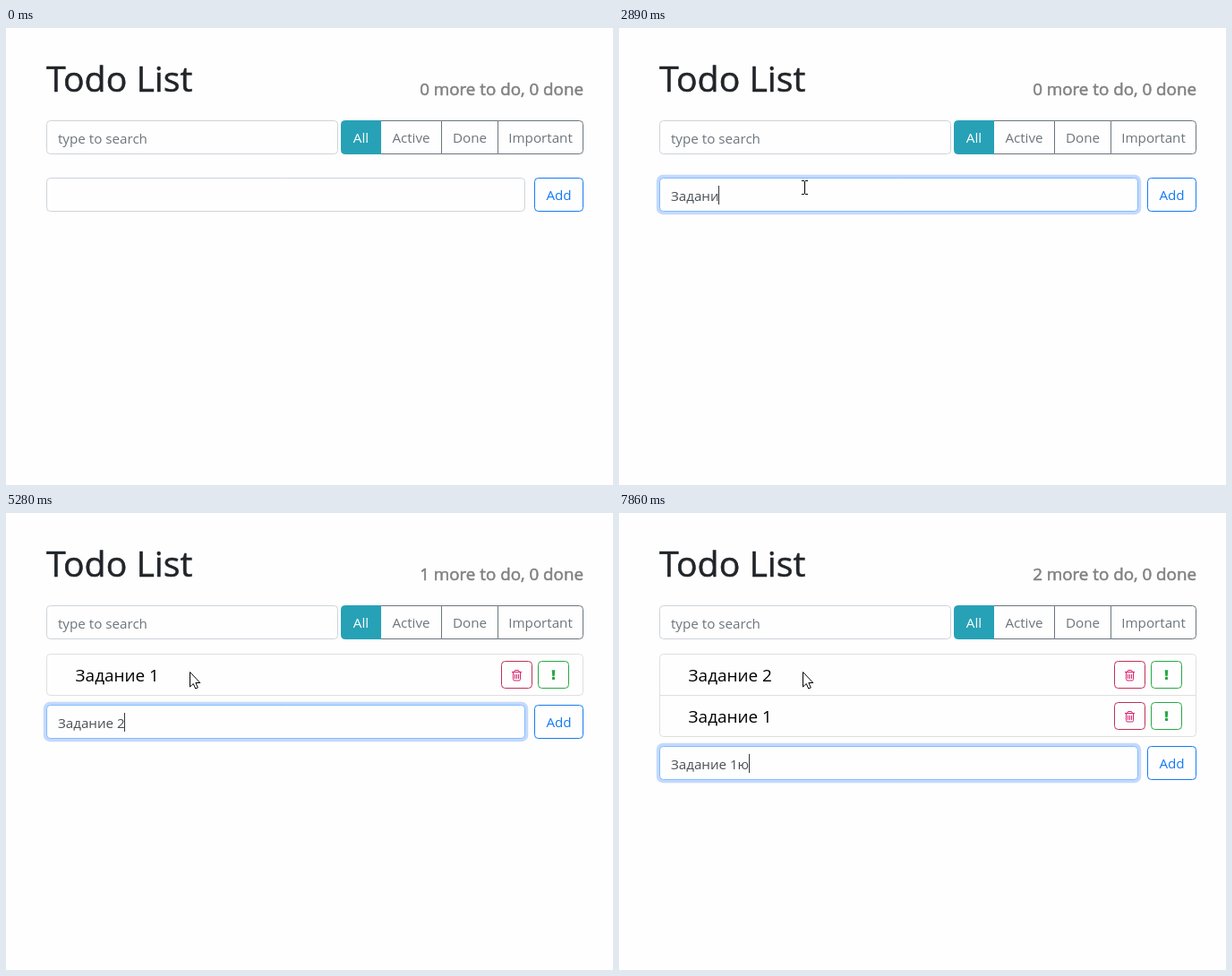
An HTML page with a canvas for the animation above (8000 ms loop, 678 by 510 pixels).

```html
<!DOCTYPE html>
<html lang="en">
<head>
<meta charset="utf-8">
<title>Todo List</title>
<style>
  html, body { margin: 0; width: 100%; height: 100%; overflow: hidden; background: #fefefe; }
  canvas { display: block; }
</style>
</head>
<body>
<canvas id="stage" width="678" height="510"></canvas>
<script>
const LOOP = 8000;
const FAMILY = '"Open Sans", "Noto Sans", sans-serif';
const BG = '#fefefe', GREY = '#6c757d', BORDER = '#ced4da', INK = '#495057';
const BLUE = '#147bf5', TEAL = '#27a1b6', GREEN = '#28a745', RED = '#c03058', PINK = '#d6246e';
const ctx = document.getElementById('stage').getContext('2d');

// Each entry: when the field is cleared, its text, and the time of every keystroke.
const entries = [
  { start: 1050, blink: [1620, 1990], text: 'Задание 1',
    keys: [1990, 2290, 2410, 2530, 2650, 2830, 2920, 3010, 3190] },
  { start: 3450, text: 'Задание 2',
    keys: [3880, 4050, 4170, 4290, 4530, 4700, 4860, 5040, 5280] },
  { start: 5600, blink: [6140, 6230], text: 'Задание 1ю',
    keys: [6230, 6320, 6500, 6680, 6860, 7040, 7160, 7380, 7680, 7860] }
];
const FOCUS = [1050, 1200];
const CLICK = [1050, 1140];
const MOVE = { start: 380, end: 940, step: 55.8 };

const clamp = v => Math.max(0, Math.min(1, v));
const within = (t, [a, b]) => t >= a && t < b;

function text(str, x, y, size, color, { align = 'left', weight = 0 } = {}) {
  ctx.font = `${size}px ${FAMILY}`;
  ctx.textAlign = align;
  ctx.fillStyle = color;
  ctx.fillText(str, x, y);
  if (weight) {
    ctx.strokeStyle = color;
    ctx.lineWidth = weight;
    ctx.lineJoin = 'round';
    ctx.strokeText(str, x, y);
  }
}

// One-pixel bordered box given by its outer edges.
function box(x, y, w, h, border, radii = 4, fill = BG) {
  ctx.beginPath();
  ctx.roundRect(x + 0.5, y + 0.5, w - 1, h - 1, radii);
  ctx.fillStyle = fill;
  ctx.fill();
  ctx.strokeStyle = border;
  ctx.lineWidth = 1;
  ctx.stroke();
}

function button(label, x, y, w, color, border, radii, fill) {
  box(x, y, w, 38, border, radii, fill);
  text(label, x + w / 2, y + 25, 15.2, color, { align: 'center' });
}

function lines(color, ...segments) {
  ctx.strokeStyle = color;
  ctx.lineWidth = 1;
  ctx.beginPath();
  for (const [x1, y1, x2, y2] of segments) {
    ctx.moveTo(x1, y1);
    ctx.lineTo(x2, y2);
  }
  ctx.stroke();
}

function header(count) {
  text('Todo List', 45, 71, 39.2, '#212529', { weight: 0.5 });
  text(`${count} more to do, 0 done`, 645, 75, 18.8, '#808080', { align: 'right', weight: 0.55 });
  box(45, 103, 326, 38, BORDER);
  text('type to search', 58, 129, 15.2, GREY);
  button('Active', 418, 103, 69, GREY, GREY, 0);
  button('Done', 486, 103, 64, GREY, GREY, 0);
  button('Important', 549, 103, 96, GREY, GREY, [0, 4, 4, 0]);
  button('All', 374, 103, 45, '#fff', TEAL, [4, 0, 0, 4], TEAL);
}

function trash(x, y) {
  ctx.save();
  ctx.translate(x, y);
  lines(PINK, [-5, -3.5, 6, -3.5], [-1.5, -5.5, 2.5, -5.5], [-1.5, -5.5, -2.5, -3.5],
    [2.5, -5.5, 3.5, -3.5], [-1.5, -1, -1.5, 4], [0.5, -1, 0.5, 4], [2.5, -1, 2.5, 4]);
  ctx.beginPath();
  ctx.roundRect(-3.5, -3.5, 8, 9.5, [0, 0, 1.5, 1.5]);
  ctx.stroke();
  ctx.restore();
}

function exclamation(x, y) {
  ctx.fillStyle = GREEN;
  ctx.beginPath();
  ctx.moveTo(x - 1.8, y - 5.2);
  ctx.lineTo(x + 1.8, y - 5.2);
  ctx.lineTo(x + 1.2, y + 1.8);
  ctx.lineTo(x - 1.2, y + 1.8);
  ctx.fill();
  ctx.beginPath();
  ctx.roundRect(x - 1.6, y + 2.6, 3.2, 2.8, 0.7);
  ctx.fill();
}

function list(items) {
  if (!items.length) return;
  box(45, 157, 600, 46 * items.length + 1, '#dfdfdf');
  items.forEach((item, i) => {
    const y = 157 + 46 * i;
    if (i) lines('#dfdfdf', [46, y + 0.5, 644, y + 0.5]);
    text(item, 77.6, y + 31, 18.95, '#000');
    box(553, y + 8, 35, 31, RED);
    trash(570, y + 24);
    box(594, y + 8, 35, 31, GREEN);
    exclamation(611.5, y + 23.5);
  });
}

function field(t, y, entry) {
  const focus = clamp((t - FOCUS[0]) / (FOCUS[1] - FOCUS[0]));
  if (focus) {
    const grow = 3.2 * focus;
    ctx.fillStyle = `rgba(20, 105, 245, ${0.25 * focus})`;
    ctx.beginPath();
    ctx.roundRect(45 - grow, y - grow, 535 + 2 * grow, 38 + 2 * grow, 4 + grow);
    ctx.fill();
  }
  const mix = (a, b) => Math.round(a + (b - a) * focus);
  box(45, y, 535, 38, `rgb(${mix(206, 128)}, ${mix(212, 189)}, ${mix(218, 255)})`);
  button('Add', 590, y, 55, BLUE, BLUE);
  if (!entry) return;

  const typed = entry.text.slice(0, entry.keys.filter(k => t >= k).length);
  text(typed, 58, y + 26, 15.15, INK);
  if (!(entry.blink && within(t, entry.blink))) {
    ctx.fillStyle = '#33383d';
    ctx.fillRect(Math.round(58 + ctx.measureText(typed).width - 0.2), y + 9, 1, 21);
  }
}

function arrow(x, y) {
  const shape = [[0, 0], [0, 16.5], [3.8, 13], [6.2, 18.5], [8.8, 17.4], [6.4, 12], [11.3, 12]];
  ctx.beginPath();
  shape.forEach(([dx, dy]) => ctx.lineTo(x + dx, y + dy));
  ctx.closePath();
  ctx.fillStyle = '#fff';
  ctx.fill();
  ctx.strokeStyle = '#000';
  ctx.lineWidth = 1;
  ctx.lineJoin = 'miter';
  ctx.stroke();
}

function beam(x, y) {
  lines('#000', [x, y - 7, x, y + 7], [x - 3.5, y - 7.5, x - 0.5, y - 7.5],
    [x + 0.5, y - 7.5, x + 3.5, y - 7.5], [x - 3.5, y + 7.5, x - 0.5, y + 7.5],
    [x + 0.5, y + 7.5, x + 3.5, y + 7.5]);
}

function pointer(t, hasItems) {
  if (t < MOVE.start) return;
  if (hasItems) return arrow(205.5, 177.5);

  // The pointer is sampled in short steps along a quadratic curve.
  const held = Math.floor((t - MOVE.start) / MOVE.step) * MOVE.step;
  const p = clamp(held / (MOVE.end - MOVE.start));
  const e = p * p * (3 - 2 * p), r = 1 - e;
  const curve = (a, b, c) => r * r * a + 2 * r * e * b + e * e * c;
  const x = Math.round(curve(330, 240, 207)) + 0.5;
  const y = Math.round(curve(488, 262, 178));
  if (y < 205) beam(x, y);
  else arrow(x, y + 0.5);

  if (within(t, CLICK)) {
    ctx.strokeStyle = '#000';
    ctx.lineWidth = 1.1;
    ctx.beginPath();
    ctx.arc(206.5, 178.5, 10, 0, 2 * Math.PI);
    ctx.stroke();
  }
}

function draw(now) {
  const t = now % LOOP;
  const started = entries.filter(e => t >= e.start);
  const items = started.slice(0, -1).map(e => e.text).reverse();
  const fieldY = items.length ? 168 + 46 * items.length : 167;
  ctx.fillStyle = BG;
  ctx.fillRect(0, 0, 678, 510);
  header(items.length);
  list(items);
  field(t, fieldY, started[started.length - 1]);
  pointer(t, items.length > 0);
}

const origin = performance.now();
function tick() {
  draw(performance.now() - origin);
  requestAnimationFrame(tick);
}
tick();
</script>
</body>
</html>
```
